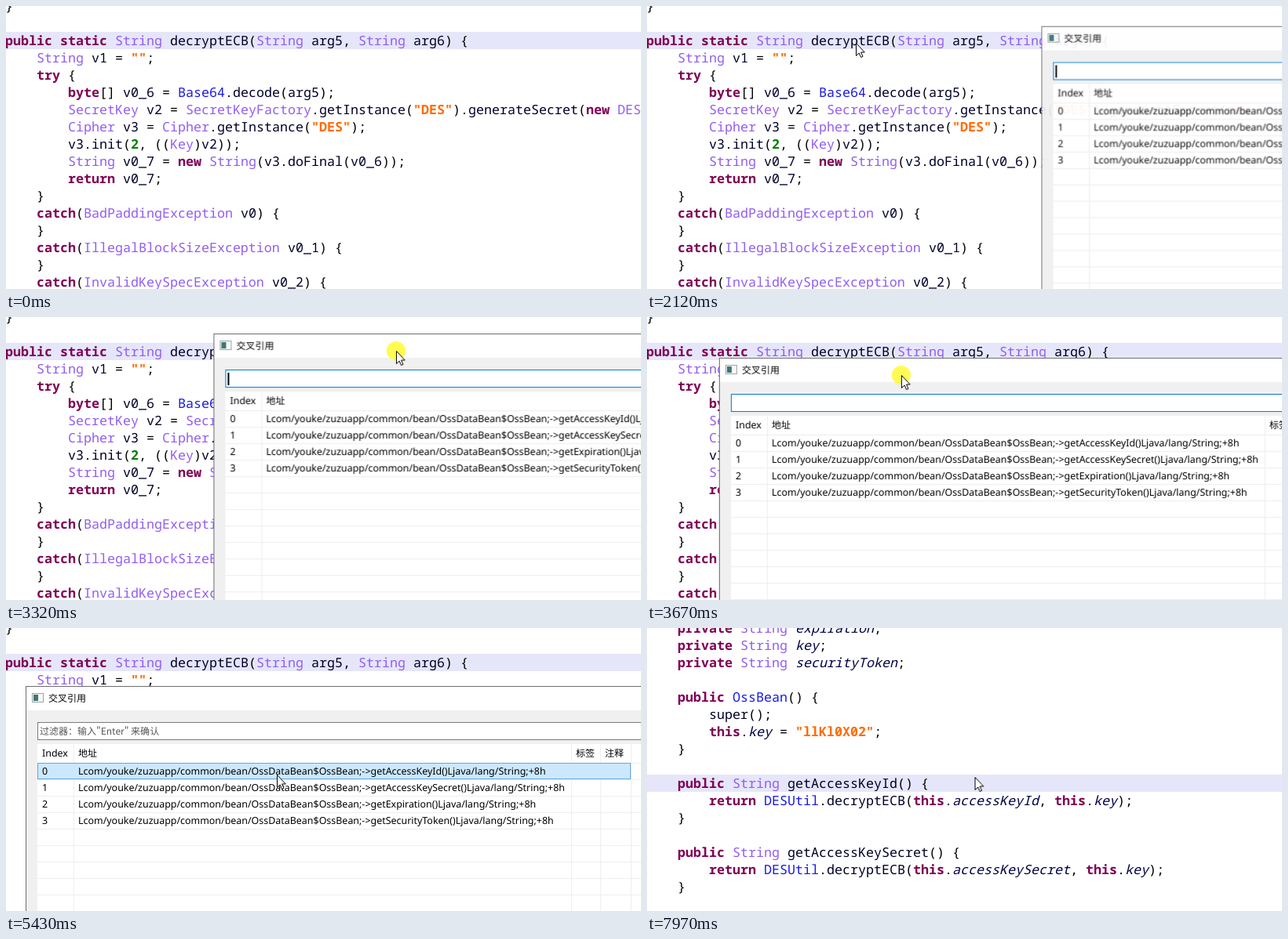
Recreate the animation shown at these times as an HTML page. Size 809 by 361 pixels, loop 8 s.

```html
<!DOCTYPE html>
<html lang="zh">
<head>
<meta charset="utf-8">
<title>Cross references</title>
<style>
html, body { margin: 0; width: 100%; height: 100%; overflow: hidden; background: #fff; }
svg { display: block; width: 809px; height: 361px; text-rendering: geometricPrecision; }

.code { font: 16.667px "Noto Sans Mono", monospace; fill: #000; }
.kw { font-weight: 700; fill: #7f0055; }
.type { fill: #925df2; }
.cls { fill: #1a1ae6; }
.str { font-weight: 700; fill: #ff6a00; }
.num { font-weight: 700; fill: #008000; }
.id { fill: #000028; }
.field { fill: #000046; font-style: italic; }
.bar { fill: #e6e6fa; }

.ui { font: 12.45px "Noto Sans", "Noto Sans CJK SC", "Noto Sans CJK", sans-serif; fill: #000; }
.cjk { font: 12px "Noto Sans CJK SC", "Noto Sans CJK", sans-serif; }
.grid { stroke: #eee; }

/* one loop is 8 s, so 1% is 80 ms */
.step { animation: 8s step-end infinite; }
#before { animation-name: before; }
#after { animation-name: after; }
#mark { animation-name: mark; }
#caret { animation-name: caret; }
#typing { animation-name: typing; }
#focus { animation-name: focus; }
#hint, #picked { animation-name: picked; }
#hover { animation-name: hover; }
#press { animation-name: press; }
#drag { animation: drag 8s linear infinite; }
#pop { animation: pop 8s linear infinite; transform-origin: 450px 320px; }
#mouse { animation: mouse 8s linear infinite; }

@keyframes before { 0% { opacity: 1 } 81.125%, 100% { opacity: 0 } }
@keyframes after { 0% { opacity: 0 } 81.125%, 100% { opacity: 1 } }
@keyframes mark { 0% { opacity: 0 } 14.5% { opacity: 1 } 23.875%, 100% { opacity: 0 } }
@keyframes caret { 0% { opacity: 0 } 14.5% { opacity: 1 } 21.375%, 100% { opacity: 0 } }
@keyframes typing {
  0% { opacity: 1 } 31.4% { opacity: 0 } 38% { opacity: 1 } 44.6% { opacity: 0 }
  51.3% { opacity: 1 } 57.9% { opacity: 0 } 64.5% { opacity: 1 } 66.5%, 100% { opacity: 0 }
}
@keyframes focus { 0% { stroke: #0078d7 } 66.5%, 100% { stroke: #7a7a7a } }
@keyframes picked { 0% { opacity: 0 } 66.5%, 100% { opacity: 1 } }
@keyframes hover { 0% { opacity: 0 } 63% { opacity: 1 } 66.5%, 100% { opacity: 0 } }
@keyframes press {
  0% { opacity: 0 } 14.4% { opacity: 1 } 17.9% { opacity: 0 }
  33.75% { opacity: 1 } 56.375% { opacity: 0 }
  66.5% { opacity: 1 } 67.6% { opacity: 0 }
  69.5% { opacity: 1 } 71.25%, 100% { opacity: 0 }
}
@keyframes drag {
  0%, 34.25% { transform: translate(500px, 24px) }
  38% { transform: translate(420px, 21px) }
  41.5% { transform: translate(265px, 21px) }
  44.25% { transform: translate(137px, 40px) }
  45.875% { transform: translate(92px, 52px) }
  48.75% { transform: translate(50px, 66px) }
  52.875% { transform: translate(27px, 74px) }
  54.125%, 100% { transform: translate(25px, 74px) }
}
@keyframes pop {
  0% { opacity: 0; transform: scale(.9) }
  24.5% { opacity: 0; transform: scale(.9); animation-timing-function: cubic-bezier(.215, .61, .355, 1) }
  27.625%, 74.125% { opacity: 1; transform: none; animation-timing-function: ease-out }
  78.25%, 100% { opacity: 0; transform: scale(.9) }
}
@keyframes mouse {
  0%, 2.74% { opacity: 0; transform: translate(671px, 337px) }
  2.75% { opacity: 1; transform: translate(671px, 337px); animation-timing-function: ease-out }
  5.75% { transform: translate(282px, 138px) }
  8.625% { transform: translate(282px, 138px); animation-timing-function: ease-in-out }
  12.125%, 23.875% { transform: translate(254px, 41px) }
  26.5% { transform: translate(266px, 47px); animation-timing-function: ease-in-out }
  33.625%, 34.25% { transform: translate(732px, 46px) }
  38% { transform: translate(652px, 43px) }
  41.5% { transform: translate(497.5px, 43px) }
  44.25% { transform: translate(369px, 62px) }
  45.875% { transform: translate(324px, 74px) }
  48.75% { transform: translate(282px, 88px) }
  52.875% { transform: translate(259px, 96px) }
  54.125% { transform: translate(257px, 96px) }
  56.375% { transform: translate(257px, 96px); animation-timing-function: ease-in-out }
  65% { transform: translate(341px, 192px) }
  66.5% { transform: translate(345px, 189px) }
  67.875%, 74.125% { transform: translate(345px, 187px) }
  77.5% { transform: translate(386px, 181px) }
  96.25% { transform: translate(386px, 181px); animation-timing-function: ease-out }
  99.625%, 100% { opacity: 1; transform: translate(417.5px, 190px) }
}
</style>
</head>
<body>
<svg viewBox="0 0 809 361">
  <g id="before" class="step">
    <rect class="bar" y="33" width="809" height="22"/>
    <rect id="mark" class="step" x="209" y="33" width="100" height="22" fill="#d2d2f0"/>
    <g id="decrypt" class="code"></g>
    <rect id="caret" class="step" x="249" y="33" width="2" height="22"/>
  </g>
  <g id="after" class="step">
    <rect width="809" height="361" fill="#fff"/>
    <rect class="bar" y="187" width="809" height="22"/>
    <g id="bean" class="code"></g>
  </g>

  <g id="drag"><g id="pop" class="ui">
    <rect x=".5" y=".5" width="899" height="639" fill="#f0f0f0" stroke="#6e6e6e"/>
    <rect x="1" y="1" width="898" height="30" fill="#fff"/>
    <rect x="8.5" y="9.5" width="14" height="11" fill="#f6f8f8" stroke="#98a4a6"/>
    <rect x="10" y="11" width="6" height="8" fill="#3f7672"/>
    <text class="cjk" x="29" y="19.5">交叉引用</text>

    <rect id="focus" class="step" x="15.5" y="46.5" width="868" height="22" fill="#fff"/>
    <rect id="typing" class="step" x="18" y="50" width="2" height="16"/>
    <text id="hint" class="cjk step" x="18" y="62" fill="#555">过滤器：输入"Enter" 来确认</text>

    <rect x="15" y="74" width="869" height="550" fill="#fff"/>
    <g id="lines" class="grid"></g>
    <rect id="hover" class="step" x="15" y="98" width="756" height="21" fill="#e5f3ff"/>
    <rect id="picked" class="step" x="15.5" y="98.5" width="755" height="20" fill="#cce8ff" stroke="#62a8dc"/>
    <g id="table"></g>
  </g></g>

  <g id="mouse">
    <circle id="press" class="step" r="12" fill="#fffb50" opacity="0"/>
    <path d="M.5 .5V16.5L4.2 13L6.6 18.5L9 17.4L6.6 12H11.3Z" fill="#fff" stroke="#000"/>
  </g>
</svg>
<script>
const $ = id => document.getElementById(id);

function add(parent, tag, attrs, text = '') {
  const el = document.createElementNS('http://www.w3.org/2000/svg', tag);
  for (const k in attrs) el.setAttribute(k, attrs[k]);
  el.textContent = text;
  parent.appendChild(el);
}

const rules = [
  [/^"/, 'str'],
  [/^(public|private|static|try|catch|return|new|byte|this)$/, 'kw'],
  [/^\d/, 'num'],
  [/^(Base64|DESUtil|OssBean)$/, 'cls'],
  [/^[A-Z]/, 'type'],
  [/^(expiration|key|securityToken|accessKeyId|accessKeySecret)$/, 'field'],
  [/^\w/, 'id'],
  [/./, 'op']
];

// Monospaced grid: 10 px columns, 22 px lines
function write(id, source) {
  source.split('\n').forEach((line, row) => {
    for (const m of line.matchAll(/"[^"]*"|\w+|[^\s\w"]+/g)) {
      const kind = rules.find(r => r[0].test(m[0]))[1];
      add($(id), 'text', { class: kind, x: m.index * 10 - 1, y: row * 22 + 6 }, m[0]);
    }
  });
}

write('decrypt', `}

public static String decryptECB(String arg5, String arg6) {
    String v1 = "";
    try {
        byte[] v0_6 = Base64.decode(arg5);
        SecretKey v2 = SecretKeyFactory.getInstance("DES").generateSecret(new DESKeySpec
        Cipher v3 = Cipher.getInstance("DES");
        v3.init(2, ((Key)v2));
        String v0_7 = new String(v3.doFinal(v0_6));
        return v0_7;
    }
    catch(BadPaddingException v0) {
    }
    catch(IllegalBlockSizeException v0_1) {
    }
    catch(InvalidKeySpecException v0_2) {`);

write('bean', `    private String expiration;
    private String key;
    private String securityToken;

    public OssBean() {
        super();
        this.key = "llKl0X02";
    }

    public String getAccessKeyId() {
        return DESUtil.decryptECB(this.accessKeyId, this.key);
    }

    public String getAccessKeySecret() {
        return DESUtil.decryptECB(this.accessKeySecret, this.key);
    }`);

for (let y = 98.5; y < 620; y += 21) add($('lines'), 'path', { d: `M15 ${y}H884` });
for (const x of [61.5, 695.5, 732.5, 771.5]) add($('lines'), 'path', { d: `M${x} 74V624` });

const cell = (x, y, text, cls = '') => add($('table'), 'text', { x, y, class: cls }, text);
cell(21, 90, 'Index');
cell(67, 90, '地址', 'cjk');
cell(701, 90, '标签', 'cjk');
cell(738, 90, '注释', 'cjk');
['AccessKeyId', 'AccessKeySecret', 'Expiration', 'SecurityToken'].forEach((name, i) => {
  const y = 113 + 21 * i;
  cell(21, y, i);
  cell(67, y, `Lcom/youke/zuzuapp/common/bean/OssDataBean$OssBean;->get${name}()Ljava/lang/String;+8h`);
});
</script>
</body>
</html>
```
